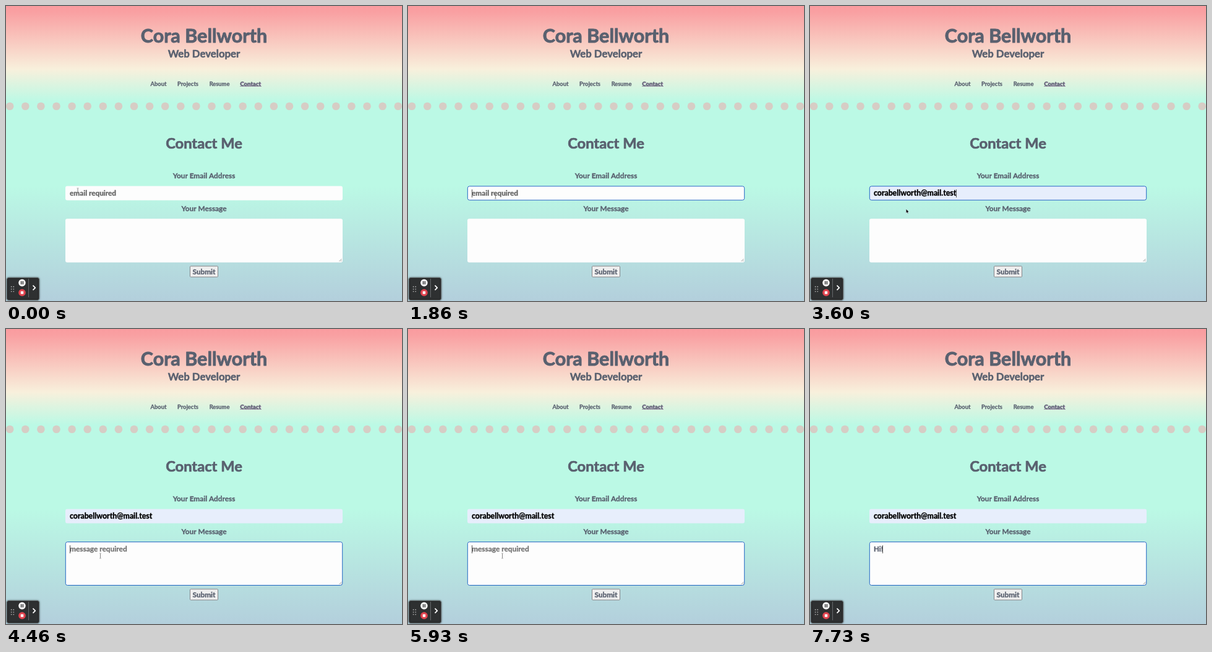
Recreate the animation shown at these times as an HTML page with a canvas. Size 640 by 476 pixels, loop 8000 ms.

```html
<!DOCTYPE html>
<html lang="en">
<head>
<meta charset="utf-8">
<title>Contact form</title>
<style>
  html, body { margin: 0; width: 100%; height: 100%; overflow: hidden; }
  canvas { display: block; width: 640px; height: 476px; }
</style>
</head>
<body>
<canvas id="stage" width="640" height="476"></canvas>
<script>
const ctx = document.getElementById('stage').getContext('2d');
const LOOP = 8000;
const FACE = 'Lato, "Open Sans", sans-serif';
const INK = '#59606f';
const EMAIL = 'corabellworth@mail.test';

// Times of the form's events in ms.
const FOCUS_EMAIL = 1400, PREVIEW = 2300, FILL = 2530, FOCUS_MESSAGE = 4460;
const TYPE_H = 6600, TYPE_I = 6930, TYPE_MARK = 7600;

const pointerPath = [
  [0, 116, 298], [860, 136, 302], [930, 138, 303], [1060, 139, 304],
  [1730, 139, 304], [2000, 144, 310], [2730, 144, 310], [3200, 150, 322],
  [3600, 155.5, 328], [4060, 152.5, 366]
];

// Draws a line of text, thickened slightly for a rounder look; returns its width.
function text(str, x, y, size, { color = INK, align = 'center', weight = 700, face = FACE } = {}) {
  ctx.font = `${weight} ${size}px ${face}`;
  ctx.textAlign = align;
  ctx.fillStyle = color;
  ctx.fillText(str, x, y);
  if (weight >= 700) {
    ctx.strokeStyle = color;
    ctx.lineWidth = size * 0.03;
    ctx.lineJoin = 'round';
    ctx.strokeText(str, x, y);
  }
  return ctx.measureText(str).width;
}

function rect(x, y, w, h, color) {
  ctx.fillStyle = color;
  ctx.fillRect(x, y, w, h);
}

function disc(x, y, r, color) {
  ctx.fillStyle = color;
  ctx.beginPath();
  ctx.arc(x, y, r, 0, Math.PI * 2);
  ctx.fill();
}

function polyline(points, color, width) {
  ctx.strokeStyle = color;
  ctx.lineWidth = width;
  ctx.beginPath();
  points.forEach(([x, y]) => ctx.lineTo(x, y));
  ctx.stroke();
}

function box(x, y, w, h, fill, radius = 3, stroke = null) {
  ctx.beginPath();
  ctx.roundRect(x, y, w, h, radius);
  ctx.fillStyle = fill;
  ctx.fill();
  if (!stroke) return;
  ctx.strokeStyle = stroke;
  ctx.lineWidth = 1;
  ctx.stroke();
}

function field(x, y, w, h, fill, focused) {
  box(x, y, w, h, fill);
  if (focused) box(x + 0.3, y + 0.3, w - 0.6, h - 0.6, fill, 3, '#1f66c2');
}

function drawBackground() {
  const sky = ctx.createLinearGradient(0, 0, 0, 476);
  [[0, '#fa9b9f'], [10, '#f9a0a2'], [102, '#f8f0dc'], [155, '#bbf9e5'],
   [290, '#bbf9e5'], [476, '#b3cfdc']]
    .forEach(([y, color]) => sky.addColorStop(y / 476, color));
  rect(0, 0, 640, 476, sky);
  for (let i = 0; i < 26; i++) disc(6.2 + i * 25.1, 161.7, 6.3, '#d6cdc5');
}

function drawHeader() {
  text('Cora Bellworth', 320, 59, 30.5);
  text('Web Developer', 320, 83, 16.8);
  text('About', 246.5, 128.5, 9.3);
  text('Projects', 294, 128.5, 9.4);
  text('Resume', 345, 128.5, 9.3);
  text('Contact', 396, 129.5, 9.6, { color: '#bfaac9' });
  text('Contact', 395, 128.5, 9.6);
  rect(378, 129, 35, 0.8, '#8a7f97');
  text('Contact Me', 320, 229.5, 23.7);
}

function drawCaret(x, y) {
  rect(Math.round(x), y, 1, 13, '#555');
}

function blinkOn(t, start) {
  return Math.floor((t - start) / 500) % 2 === 0;
}

function drawEmail(t) {
  const focused = t >= FOCUS_EMAIL && t < FOCUS_MESSAGE;
  const fill = t >= PREVIEW ? '#e7eefc' : '#fdfdfd';
  field(96, 290.5, 448, 23, fill, focused);
  if (t < PREVIEW) {
    text('email required', 103, 306.3, 11.8, { align: 'left', color: '#666' });
    if (focused && blinkOn(t, FOCUS_EMAIL)) drawCaret(103, 296);
  } else if (t < FILL) {
    text(EMAIL, 103, 306, 7.4, {
      align: 'left', color: '#111', weight: 400, face: '"Liberation Sans", Arial, sans-serif'
    });
  } else {
    const width = text(EMAIL, 103, 306.3, 12.3, { align: 'left', color: '#000' });
    if (focused && blinkOn(t, FILL)) drawCaret(103 + width, 296);
  }
}

function drawMessage(t) {
  const focused = t >= FOCUS_MESSAGE;
  field(96, 343.3, 448, 70.5, '#fdfdfd', focused);
  polyline([[538.5, 412], [542.5, 408]], '#777', 0.7);
  polyline([[541, 412], [542.5, 410.5]], '#777', 0.7);
  if (!focused) return;
  if (t < TYPE_H) {
    text('message required', 103, 359.3, 11.9, { align: 'left', color: '#757575' });
    if (blinkOn(t, FOCUS_MESSAGE)) drawCaret(103, 349);
    return;
  }
  const [typed, since] = t < TYPE_I ? ['H', TYPE_H] : t < TYPE_MARK ? ['Hi', TYPE_I] : ['Hi!', TYPE_MARK];
  const width = text(typed, 103, 359.3, 11.5, { align: 'left' });
  if (blinkOn(t, since)) drawCaret(102.5 + width, 349);
}

function drawForm(t) {
  text('Your Email Address', 320, 277.8, 11.8);
  drawEmail(t);
  text('Your Message', 320, 330.8, 11.8);
  drawMessage(t);
  box(297.5, 419.8, 45, 17.4, '#efefef', 1, '#858589');
  text('Submit', 320, 433, 11.8);
}

function drawRecorder() {
  ctx.save();
  ctx.shadowColor = 'rgba(0,0,0,.5)';
  ctx.shadowBlur = 3;
  box(1.5, 438.5, 52, 36, '#2e3031', 3, '#5b5f60');
  ctx.restore();
  for (let i = 0; i < 6; i++) disc(8.7 + (i % 2) * 3.6, 453 + Math.floor(i / 2) * 3.8, 0.9, '#aaa');
  disc(26, 446.6, 5.8, '#f5f5f5');
  rect(23.9, 444, 1.4, 5.2, '#2e3031');
  rect(26.7, 444, 1.4, 5.2, '#2e3031');
  disc(26, 462.5, 5.8, '#e0434e');
  rect(23.8, 460.3, 4.4, 4.4, '#fff');
  rect(36, 440, 1, 30, '#66696b');
  polyline([[43.5, 450.8], [47.3, 454.6], [43.5, 458.4]], '#fff', 1.7);
}

function pointerAt(t) {
  const next = pointerPath.findIndex(([time]) => time > t);
  if (next < 0) return pointerPath.at(-1).slice(1);
  const [t0, x0, y0] = pointerPath[next - 1];
  const [t1, x1, y1] = pointerPath[next];
  const p = (t - t0) / (t1 - t0);
  const ease = p * p * (3 - 2 * p);
  return [x0 + (x1 - x0) * ease, y0 + (y1 - y0) * ease];
}

function drawPointer(t) {
  if (t >= TYPE_H) return;
  const [x, y] = pointerAt(t);
  const overField = y < 314 || y > 343;
  ctx.save();
  ctx.translate(x, y);
  if (overField) {
    polyline([[0, -3.5], [0, 3.5]], '#777', 0.9);
    polyline([[-1.5, -4], [1.5, -4]], '#888', 0.7);
    polyline([[-1.5, 4], [1.5, 4]], '#888', 0.7);
  } else {
    ctx.beginPath();
    [[0, 0], [0, 5.8], [1.4, 4.6], [2.3, 6.6], [3.2, 6.2], [2.3, 4.2], [4.1, 4.1]]
      .forEach(([px, py]) => ctx.lineTo(px, py));
    ctx.closePath();
    ctx.strokeStyle = '#eef';
    ctx.lineWidth = 0.8;
    ctx.stroke();
    ctx.fillStyle = '#111';
    ctx.fill();
  }
  ctx.restore();
}

const start = performance.now();

function render(now) {
  const t = Math.max(0, now - start) % LOOP;
  drawBackground();
  drawHeader();
  drawForm(t);
  drawRecorder();
  drawPointer(t);
  requestAnimationFrame(render);
}

render(start);
</script>
</body>
</html>
```
